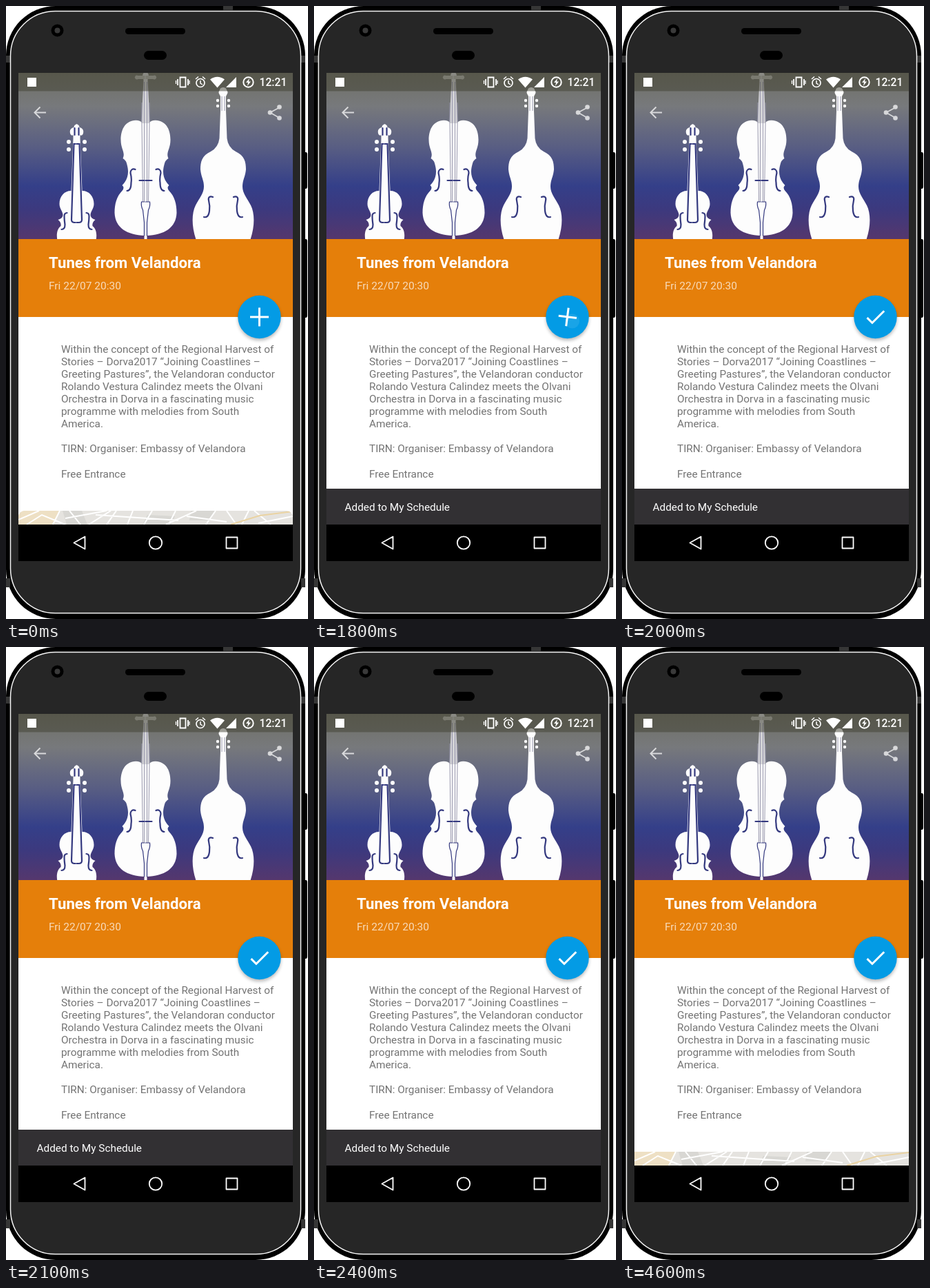
Animation of 438x889 px, one loop 4.7 s. Source, as an HTML page:

```html
<!DOCTYPE html>
<html lang="en">
<head>
<meta charset="utf-8">
<title>Event details</title>
<style>
  html, body { margin: 0; width: 100%; height: 100%; overflow: hidden; background: #fff; }
  svg { display: block; width: 438px; height: 889px; font: 15.35px Roboto, sans-serif; }
  .line { fill: none; stroke: #fff; stroke-width: 2; }
  .ink { fill: none; stroke: #34397f; stroke-width: 2.2; stroke-linecap: round; }
  .string { fill: none; stroke: #9695ab; stroke-width: 1; }
</style>
</head>
<body>
<svg viewBox="0 0 438 889">
  <defs>
    <linearGradient id="sky" x2="0" y2="1">
      <stop offset="0" stop-color="#6f6f65"/>
      <stop offset=".2" stop-color="#77797c"/>
      <stop offset=".45" stop-color="#585d83"/>
      <stop offset=".68" stop-color="#343f89"/>
      <stop offset=".82" stop-color="#3c397e"/>
      <stop offset="1" stop-color="#55376d"/>
    </linearGradient>
    <clipPath id="photo"><path d="M18 97H416V338H18z"/></clipPath>
    <clipPath id="strip"><rect id="mapClip" x="18" y="732" width="398" height="40"/></clipPath>
    <filter id="blur" x="-30%" y="-30%" width="160%" height="160%"><feGaussianBlur stdDeviation="2.5"/></filter>

    <!-- left halves, mirrored around x = 0 -->
    <g id="violin">
      <path fill="#fdfdfd" d="M1 171.500C-3 171.500-4 174-4 176C-9 177-11 181-9 186Q-7 189-5 187L-5 192-8 268C-18 268-25 276-25 287C-25 294-20 298-20 303Q-20 308-27 310Q-22 314-23 319C-30 325-29 334-28 340H1z"/>
      <circle cx="-11.500" cy="197" r="3" fill="#fdfdfd"/><circle cx="-11.500" cy="208" r="3" fill="#fdfdfd"/>
      <path class="ink" d="M0 200H-4L-7.500 310Q-7.500 314-3 314H0"/>
      <path class="ink" d="M-3 177V187"/>
      <path class="ink" d="M-14 300q-4 0-4 5t1 12q0 7-5 7"/>
    </g>
    <g id="cello">
      <path fill="#d3d3d6" d="M1 97H-3Q-6 101-3 107L-6 170H1z"/>
      <path fill="#b5b5b0" d="M0 101H-11a3 3 0 1 0 0 5H0z"/>
      <path fill="#fdfdfd" d="M1 170H-5Q-8 165-17 166C-31 168-36 181-36 194C-36 208-29 212-33 221Q-28 224-27 230C-24 241-25 251-34 260Q-30 263-34 268C-42 276-45 287-45 300C-44 322-27 332-1 333H1z"/>
      <path fill="#fdfdfd" d="M1 330H-2V338H1z"/>
      <path class="string" d="M-2 110V284M-5.500 140V170L-4 284"/>
      <path class="ink" d="M-15 237c-4-2-7 1-7 5q2 8 1 14c0 8-2 12-6 12"/>
      <path class="ink" d="M0 253H-9"/>
      <path class="ink" style="stroke-width:1.2" d="M0 284H-6Q-7 290-4 296L-2 314V333"/>
    </g>
    <g id="bass">
      <path fill="#fdfdfd" d="M1 118Q-5 118-5 122Q-8 125-5 129L-4 131V152L-5.500 192Q-7 205-18 211C-31 217-33 226-33 237C-32 248-28 252-28 262C-28 272-35 279-40 289C-46 301-46 320-39 340H1z"/>
      <circle cx="-8" cy="137" r="2.200" fill="#fdfdfd"/><circle cx="-8" cy="145" r="2.200" fill="#fdfdfd"/>
      <path class="string" d="M-2 131V152"/>
      <path class="ink" d="M-15 277c-5-2-7 1-6 5q2 8 1 15c-1 8-4 10-8 9"/>
    </g>
  </defs>

  <!-- phone body -->
  <path d="M432 212h3q2 0 2 4v45q0 4-2 4h-3zM432 338h3q2 0 2 4v106q0 4-2 4h-3z"/>
  <rect width="434" height="889" rx="72"/>
  <path fill="#363636" d="M315 0h14v6H315zM0 72h6v10H0zM428 72h6v10h-6zM0 830h6v13H0zM428 830h6v13h-6z"/>
  <rect x="6.500" y="7.500" width="421" height="873" rx="65" fill="#262626" stroke="#f4f4f4" stroke-width="1.500"/>
  <circle cx="74.500" cy="35.500" r="9"/>
  <circle cx="74.500" cy="35.500" r="4" fill="#3a3a3a"/>
  <rect x="173" y="32" width="87" height="9" rx="4.500"/>
  <rect x="200" y="65" width="33" height="13" rx="6.500"/>

  <!-- header picture -->
  <path fill="#fff" d="M18 97H416V805H18z"/>
  <path fill="url(#sky)" d="M18 97H416V338H18z"/>
  <g clip-path="url(#photo)">
    <g transform="translate(102.500)"><use href="#violin"/><use href="#violin" transform="scale(-1 1)"/></g>
    <g transform="translate(202.500)"><use href="#cello"/><use href="#cello" transform="scale(-1 1)"/></g>
    <g transform="translate(315)"><use href="#bass"/><use href="#bass" transform="scale(-1 1)"/></g>
  </g>
  <path fill="#404033" fill-opacity=".5" d="M18 97H416V123.500H18z"/>

  <!-- status bar -->
  <rect x="31" y="104" width="13" height="13" fill="#fff"/>
  <path class="line" d="M252.500 103.500h8v14h-8zM249 106v9M264 106v9" style="stroke-width:1.8"/>
  <path class="line" d="M246.500 108v5M266 108v5" style="stroke-width:1.3"/>
  <circle class="line" cx="282" cy="111.500" r="6" style="stroke-width:1.7"/>
  <path class="line" d="M275 106l4-3.500M289 106l-4-3.500M282 108v4l3 2" style="stroke-width:1.5"/>
  <path fill="#fff" d="M296 106.500Q306.500 99 317 106.500L306.500 118.500zM334 103v15H319z"/>
  <circle class="line" cx="351.500" cy="110.500" r="7.200"/>
  <path fill="#fff" d="M353 105l-5 6h3l-1 5 5-6.500h-3z"/>
  <text x="367.500" y="116" font-size="15.700" font-weight="500" fill="#fff">12:21</text>

  <!-- toolbar -->
  <g opacity=".72">
    <path class="line" d="M58 154.500H42M49.500 146.500l-8 8 8 8"/>
    <path class="line" d="M397 147l-14 7.500 14 8" style="stroke-width:1.7"/>
    <g fill="#fff"><circle cx="383" cy="154.500" r="3.300"/><circle cx="396.500" cy="146.500" r="3.300"/><circle cx="396.500" cy="162.500" r="3.300"/></g>
  </g>

  <!-- title -->
  <path fill="#e57f0a" d="M18 338H416V451H18z"/>
  <text x="62" y="379.500" font-size="22.200" font-weight="700" fill="#fff">Tunes from Velandora</text>
  <text x="62" y="411" font-size="15.500" fill="#fff" fill-opacity=".72">Fri 22/07 20:30</text>
  <g id="body" fill="#737373"></g>

  <!-- map -->
  <g clip-path="url(#strip)">
    <path fill="#e5e3df" d="M18 732H416V752H18z"/>
    <path fill="#eee0c4" d="M18 732H78L70 752H18z"/>
    <path fill="#d8d7d3" d="M82 732h28l8 20H88zM205 738l40 2-5 12h-42zM268 732h36l-8 14h-30z"/>
    <path class="line" d="M18 745l30-13M30 752l22-14 34 14M78 732l-10 20M92 732l16 20M86 743l60-11M120 752l32-20M130 738l120 8M160 732l-14 20M184 732l-8 20M212 732l-12 20M246 732l-10 20M232 752l44-20M262 740l58 8M304 732l-14 20M320 732l14 20M352 732l-10 20M384 752l-24-20M366 750l50-10"/>
    <path fill="none" stroke="#ead3a2" stroke-width="2" d="M326 752l42-13 48-6"/>
  </g>

  <g id="snack">
    <path fill="#323033" d="M18 700H416V752H18z"/>
    <text x="44.500" y="732" fill="#fff">Added to My Schedule</text>
  </g>

  <!-- floating button -->
  <circle cx="367.500" cy="454" r="31" opacity=".28" filter="url(#blur)"/>
  <circle cx="367.500" cy="451" r="31.200" fill="#039be5"/>
  <path id="icon" class="line" style="stroke-width:3"/>
  <circle id="touch" cx="374.500" cy="457" r="10.500" fill="#dff2fc"/>

  <!-- navigation bar -->
  <path d="M18 752H416V805H18z"/>
  <path class="line" style="stroke-width:1.8" stroke-linejoin="round" d="M98.500 778.500L114.500 769.500V787.500zM319.500 770.500h16v16h-16z"/>
  <circle class="line" style="stroke-width:1.8" cx="217" cy="778.500" r="9.200"/>
</svg>
<script>
const $ = id => document.getElementById(id);
const LOOP = 4700, STEP = 100;

const copy = [
  'Within the concept of the Regional Harvest of',
  'Stories – Dorva2017 “Joining Coastlines –',
  'Greeting Pastures”, the Velandoran conductor',
  'Rolando Vestura Calindez meets the Olvani',
  'Orchestra in Dorva in a fascinating music',
  'programme with melodies from South',
  'America.', '',
  'TIRN: Organiser: Embassy of Velandora', '',
  'Free Entrance'
];
$('body').innerHTML = copy.map((s, i) => `<text x="80" y="${503 + i * 18.05}">${s}</text>`).join('');

// The tick is stored upside down, since the icon makes half a turn as it morphs.
const plus = [-13.5, 0, 13.5, 0, 0, -13.5, 0, 13.5];
const tick = [4.6, -8.5, 12, -1.1, 5.6, -9.5, -12.7, 8.7];

function draw() {
  const t = Math.floor(performance.now() % LOOP / STEP) * STEP;
  const u = Math.min(1, Math.max(0, (t - 1775) / 225));
  const p = u * u * (3 - 2 * u);
  const [a, b, c, d, e, f, g, h] = plus.map((v, i) => v + (tick[i] - v) * p);
  $('icon').setAttribute('d', `M${a} ${b}L${c} ${d}M${e} ${f}L${g} ${h}`);
  $('icon').setAttribute('transform', `translate(367.5 451) rotate(${180 * p})`);
  $('touch').setAttribute('opacity', t === 1700 ? .45 : t === 1800 ? .1 : 0);
  $('snack').setAttribute('visibility', t >= 1800 && t < 4600 ? 'visible' : 'hidden');
  $('mapClip').setAttribute('rx', t < 1700 ? 9 : 0);
  requestAnimationFrame(draw);
}
draw();
</script>
</body>
</html>
```
